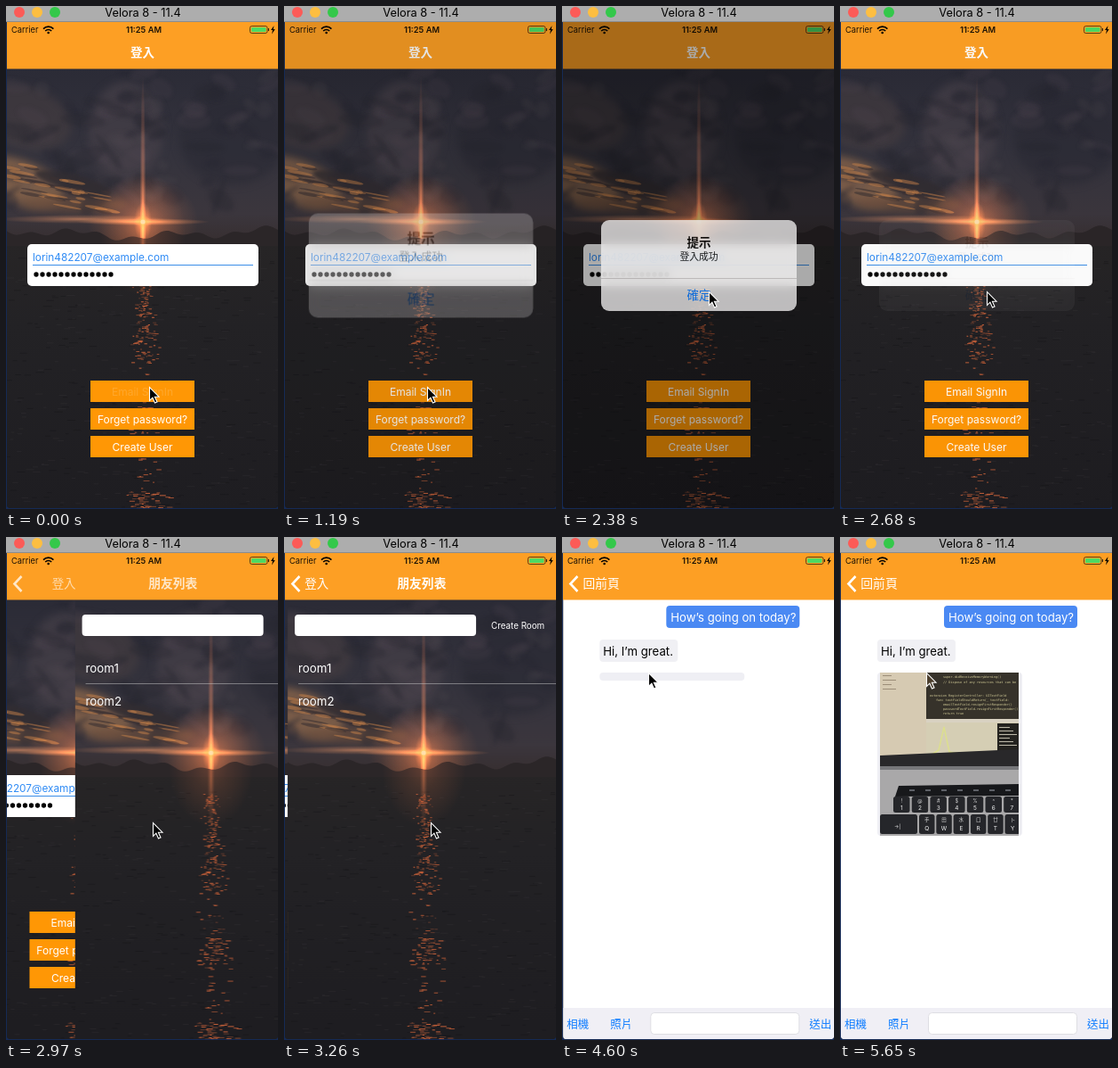
Recreate the animation shown at these times as an HTML page with a canvas. Size 306 px wide and 564 px high, loop 8 s.

```html
<!DOCTYPE html>
<html lang="zh-Hant">
<head>
<meta charset="utf-8">
<title>Login and chat demo</title>
<style>
html, body { margin: 0; width: 100%; height: 100%; overflow: hidden; background: #152a55; }
#stage { position: absolute; left: 0; top: 0; width: 306px; height: 564px; overflow: hidden; background: #152a55; }
#screen { position: absolute; left: 1px; top: 18px; width: 305px; height: 545px; overflow: hidden; border-radius: 0 0 4px 4px; background: #1d1d1f; }
.page, .page > *, #dim, #nav { position: absolute; left: 0; top: 0; width: 305px; height: 545px; }
#chat { background: #fff; }
#dim { background: #000; }
#alert { position: absolute; left: 43px; top: 222px; width: 220px; height: 102px; border-radius: 9px; overflow: hidden;
  background: rgba(247, 246, 246, .9); backdrop-filter: blur(6px); }
#bar, #cursor { position: absolute; left: 0; top: 0; }
svg { display: block; overflow: hidden; }
text { font-family: Inter, "Noto Sans CJK TC", "Noto Sans CJK JP", "Noto Sans CJK", sans-serif; dominant-baseline: central; white-space: pre; }
.mono text { font-family: "DejaVu Sans Mono", monospace; }
</style>
</head>
<body>
<div id="stage">
  <div id="screen">
    <div class="page" id="login"><canvas width="305" height="545"></canvas></div>
    <div class="page" id="rooms"><canvas width="305" height="545"></canvas></div>
    <div class="page" id="chat"></div>
    <div id="nav"></div>
    <div id="dim"></div>
    <div id="alert"></div>
  </div>
  <div id="bar"></div>
  <svg id="cursor" width="14" height="21" viewBox="-1 -1 14 21">
    <path id="arrow" d="M.5 .7V15.4L3.9 12.2L6.5 18L9 16.9L6.4 11.2H11Z" fill="#000" stroke="#fff" stroke-width="1.1"/>
  </svg>
</div>
<script>
const LOOP = 8000, STEP = 148.1, W = 305;
const BLUE = '#0f7dff', ORANGE = '#ff9705';
const $ = id => document.getElementById(id);

// ---- markup helpers
const text = (x, y, s, size, fill = '#fff', more = '') =>
  `<text x="${x}" y="${y}" font-size="${size}" fill="${fill}" ${more}>${s}</text>`;
const mid = (x, y, s, size, fill, more = '') => text(x, y, s, size, fill, 'text-anchor="middle" ' + more);
const rect = (x, y, w, h, fill, r = 0, more = '') =>
  `<rect x="${x}" y="${y}" width="${w}" height="${h}" rx="${r}" fill="${fill}" ${more}/>`;
const circle = (x, y, r, fill) => `<circle cx="${x}" cy="${y}" r="${r}" fill="${fill}"/>`;
const put = (id, body, box = [1, 18, W, 545]) => $(id).insertAdjacentHTML('beforeend',
  `<svg width="${box[2]}" height="${box[3]}" viewBox="${box.join(' ')}">${body}</svg>`);
const repeat = (n, fn) => Array.from({ length: n }, (_, i) => fn(i)).join('');

// ---- sunset backdrop
function sunset(canvas) {
  const c = canvas.getContext('2d');
  let seed = 11;
  const rnd = () => (seed = (seed * 16807) % 2147483647) / 2147483647;
  const bell = () => rnd() + rnd() + rnd() - 1.5;
  const fade = (g, stops) => { stops.forEach(([o, col]) => g.addColorStop(o, col)); return g; };
  const blob = (x, y, rx, ry, col, turn = 0) => {
    c.fillStyle = col;
    c.beginPath();
    c.ellipse(x, y, rx, ry, turn, 0, 7);
    c.fill();
  };
  const glow = (x, y, rx, ry, rgb, alpha) => {
    c.save();
    c.translate(x, y);
    c.scale(rx, ry);
    c.fillStyle = fade(c.createRadialGradient(0, 0, 0, 0, 0, 1),
      [[0, `rgba(${rgb},${alpha})`], [.4, `rgba(${rgb},${alpha * .5})`], [1, `rgba(${rgb},0)`]]);
    c.fillRect(-1, -1, 2, 2);
    c.restore();
  };
  c.translate(-1, -18);

  // sky and clouds
  c.fillStyle = fade(c.createLinearGradient(0, 70, 0, 262),
    [[0, '#2b2b36'], [.5, '#34333d'], [.85, '#3b363d'], [1, '#372f31']]);
  c.fillRect(0, 0, 306, 270);
  c.filter = 'blur(5px)';
  blob(135, 140, 42, 55, 'rgba(74,68,76,.6)');
  blob(20, 125, 55, 35, 'rgba(70,62,66,.6)', .3);
  blob(15, 197, 52, 24, 'rgba(134,100,76,.85)', .35);
  blob(75, 222, 60, 9, 'rgba(108,78,60,.7)');
  blob(255, 150, 60, 50, 'rgba(42,42,52,.6)');
  c.filter = 'blur(2px)';
  for (let i = 0; i < 80; i++)
    blob(rnd() * 306, 75 + rnd() * 145, 6 + rnd() * 20, 3 + rnd() * 7,
      i % 2 ? 'rgba(38,38,48,.35)' : 'rgba(82,76,84,.18)', bell());
  blob(75, 198, 44, 9, 'rgba(50,45,50,.85)', .25);
  c.filter = 'blur(.7px)';
  for (let i = 0; i < 44; i++) {
    const x = rnd() * 115;
    blob(x, 168 + x * .35 + rnd() * 34, 4 + rnd() * 13, .8 + rnd() * 1.4,
      i % 2 ? 'rgba(200,130,74,.5)' : 'rgba(58,48,50,.6)', .18);
  }
  c.filter = 'none';

  // sun
  c.globalCompositeOperation = 'lighter';
  glow(154, 242, 62, 52, '150,66,20', .6);
  glow(85, 239, 95, 5, '190,105,50', .6);
  glow(154, 242, 75, 4, '230,120,50', .75);
  glow(154, 242, 3.5, 165, '190,88,38', .75);
  glow(154, 242, 10, 22, '220,100,35', .6);
  c.globalCompositeOperation = 'source-over';

  // mountains and water
  c.fillStyle = '#2b2628';
  c.beginPath();
  c.moveTo(0, 285);
  for (let x = 0; x <= 306; x += 3)
    c.lineTo(x, 255 + 3.5 * Math.sin(x / 17) + 2.5 * Math.sin(x / 6) - 3 * Math.cos(x / 49));
  c.lineTo(306, 285);
  c.fill();
  c.fillStyle = fade(c.createLinearGradient(0, 268, 0, 563), [[0, '#272526'], [.3, '#232225'], [1, '#1e1d21']]);
  c.fillRect(0, 269, 306, 300);
  for (let i = 0; i < 420; i++) {
    c.fillStyle = i % 2 ? 'rgba(62,58,62,.28)' : 'rgba(16,16,19,.32)';
    c.fillRect(rnd() * 306, 276 + rnd() * 288, 3 + rnd() * 7, 1);
  }
  c.globalCompositeOperation = 'lighter';
  glow(154, 255, 48, 70, '95,42,18', .6);
  glow(154, 270, 4, 60, '130,60,28', .6);
  c.globalCompositeOperation = 'source-over';
  glow(154, 242, 8, 8, '255,175,90', 1);
  blob(154, 242, 2.6, 2.6, '#ffe0ac');

  // reflection, brighter in bands
  for (let i = 0; i < 620; i++) {
    const y = 288 + rnd() * 275, d = (y - 288) / 275;
    const band = Math.max(0, Math.cos((y - 463) / 15.3));
    if (rnd() > (y < 400 ? .75 : .2 + .75 * band)) continue;
    c.fillStyle = ['#c4603a', '#7d4530', '#a65334', '#5c382d'][i % 4];
    c.fillRect(153 + d * 5 + bell() * (7 + 19 * d), y, 1.5 + rnd() * (2 + 4 * d), 1);
  }
}
document.querySelectorAll('canvas').forEach(sunset);

// ---- login page
const button = (y, label, id) => rect(95, y, 117, 24, ORANGE) +
  mid(153.5, y + 12.5, label, 12, '#fff', `id="${id}"`);
put('login',
  rect(24, 267, 260, 47, '#fff', 5) +
  text(30, 282, 'lorin482207@example.com', 11.8, '#2f8bf5') +
  rect(30, 290, 248, 1, '#3b8ee8') +
  repeat(13, i => circle(34 + 7 * i, 301, 2.65, '#000')) +
  button(420, 'Email SignIn', 'signIn') +
  button(451, 'Forget password?', 'forget') +
  button(482, 'Create User', 'create'));

// ---- room list
put('rooms',
  rect(9, 87, 204, 24, '#fff', 4) +
  text(230, 99.5, 'Create Room', 9.8) +
  text(13, 146.5, 'room1', 13.3) +
  rect(13, 164, 293, 1, 'rgba(200,200,200,.5)') +
  text(13, 183.5, 'room2', 13.3));

// ---- chat page
const code = [
  [116, 157, 'super.didReceiveMemoryWarning()'],
  [116, 162.5, '// Dispose of any resources that can be'],
  [101, 178, 'extension RegisterController: UITextField'],
  [108, 183, 'func textFieldShouldReturn(_ textField:'],
  [116, 188, 'emailTextField.resignFirstResponder()'],
  [116, 193, 'passwordTextField.resignFirstResponder()'],
  [116, 198, 'return true']
];
const key = (x, y, w, h, top, low) => rect(x, y, w, h, '#25262a', 2.5) +
  mid(x + w / 2, y + h * .28, top, 5.5, '#d8d8d8') + mid(x + w / 2, y + h * .72, low, 6.5, '#f2f2f2');
const laptop =
  rect(45, 152, 156, 183, '#cfc1a6') +
  rect(45, 152, 52, 93, '#d6cab2') +
  repeat(4, i => rect(48, 155 + i * 5, 10 + i % 2 * 5, 1, '#9c8e78')) +
  rect(97, 152, 104, 52, '#36322a') +
  `<g class="mono">${code.map(([x, y, s]) => text(x, y, s, 3.5, '#d6cf9a')).join('')}</g>` +
  rect(97, 204, 104, 4, '#d9d2c2') +
  rect(97, 208, 104, 37, '#d5ceb4') +
  '<path d="M103 244l8-5 6-26 6 28 12 2" fill="none" stroke="#dcdf8e" stroke-width="1.5"/>' +
  rect(177, 209, 24, 32, '#24231f') +
  repeat(6, i => rect(179, 213 + i * 4, 12 + i % 3 * 4, 1, '#bdb9a8')) +
  '<path d="M45 245L201 238V258L45 258Z" fill="#29282a"/>' +
  rect(45, 257, 156, 78, '#a9a8a9') +
  rect(45, 257, 156, 4, '#77777a') +
  '<path d="M66 279L201 277V290L62 291Z" fill="#17181b"/>' +
  repeat(7, i => rect(78 + i * 18, 283, 6, 2, '#5d6066')) +
  repeat(7, i => key(60 + i * 20.7, 291, 18.5, 18, '!@#$%^*'[i], i + 1)) +
  rect(45, 311, 42, 22, '#25262a', 2.5) + text(61, 325, '→|', 5.5, '#eee') +
  repeat(6, i => key(89 + i * 19.3, 311, 17.5, 22, '手田水口廿卜'[i], 'QWERTY'[i]));
put('chat',
  rect(117, 77, 150, 25, '#4a89f3', 4) +
  text(122, 89.5, 'How’s going on today?', 13.2) +
  rect(42, 115, 88, 25, '#f0f0f4', 4) +
  text(46, 127.5, 'Hi, I’m great.', 13.2, '#000') +
  rect(42, 152, 163, 9, '#efeff4', 4, 'id="bubble"') +
  `<svg id="photo" x="45" y="152" width="156" height="183" viewBox="45 152 156 183">${laptop}</svg>` +
  rect(1, 528, 305, 36, '#f0eff5') +
  rect(99.5, 533.5, 167, 24, '#fff', 4, 'stroke="#dedee3"') +
  text(5, 546, '相機', 12.5, BLUE) + text(54, 546, '照片', 12.5, BLUE) + text(278, 546, '送出', 12.5, BLUE));

// ---- status and navigation bar
put('nav',
  rect(1, 18, 305, 52, '#fd9f24') + rect(1, 70, 305, 1, 'rgba(253,159,36,.5)') +
  text(6, 26.5, 'Carrier', 9.3, '#1c1205') +
  '<g fill="none" stroke="#000" stroke-width="1.6"><path d="M42 25.6a7.8 7.8 0 0 1 11.4 0M44.2 28a4.8 4.8 0 0 1 7 0"/></g>' +
  circle(47.7, 30, 1.3, '#000') +
  mid(155, 26.5, '11:25 AM', 9.3, '#1c1205', 'font-weight="600"') +
  rect(274.5, 22.5, 19.5, 8, 'none', 2, 'stroke="#3a2a10" stroke-width=".8"') +
  rect(276, 24, 16.5, 5, '#4cd964', 1) + rect(294.8, 25, 1.2, 3, '#3a2a10') +
  '<path d="M301.5 22l-3.5 5h2l-1 4.5 3.7-5.5h-2z" fill="#000"/>' +
  '<path id="chevron" d="M17.5 44L9.5 52.5L17.5 61" fill="none" stroke="#fff" stroke-width="2.6"/>' +
  mid(0, 52, '登入', 13.5, '#fff', 'id="title1" font-weight="700"') +
  mid(0, 52, '登入', 13.5, '#fff', 'id="back1"') +
  mid(0, 52, '朋友列表', 13.8, '#fff', 'id="title2" font-weight="700"') +
  mid(0, 52, '回前頁', 13.8, '#fff', 'id="back2"'));

// ---- alert
put('alert',
  mid(154, 265, '提示', 13.5, '#000', 'font-weight="700"') +
  mid(154, 282, '登入成功', 10.8, '#000') +
  rect(44, 305, 220, 1, 'rgba(110,105,105,.35)') +
  mid(154, 324, '確定', 13.5, BLUE), [44, 240, 220, 102]);

// ---- window title bar
put('bar',
  rect(0, 0, 306, 17, '#adadad') + rect(0, 17, 306, 1, '#8c8c8c') +
  circle(15, 7, 6, '#fc5b57') + circle(35, 7, 6, '#fdbe41') + circle(55, 7, 6, '#34c84a') +
  mid(154, 7.5, 'Velora 8 - 11.4', 12.8, '#000'), [0, 0, 306, 18]);

// ---- motion
const path = [[0, 161, 427], [1200, 161, 427], [1760, 160, 315], [1960, 160, 315], [2060, 165, 320],
  [3270, 165, 320], [3400, 126, 189], [3550, 111, 170], [3690, 99, 153], [3980, 97, 152], [LOOP, 97, 152]];

const settle = (t, start, rate = 13.3) => {
  const k = Math.max(0, t - start) / 1000 * rate;
  return 1 - (1 + k) * Math.exp(-k);
};
const mix = (a, b, p) => a + (b - a) * p;
const clamp = v => Math.min(1, Math.max(0, v));
const place = (id, x, alpha) => {
  $(id).setAttribute('x', x);
  $(id).setAttribute('opacity', clamp(alpha));
};
const slide = (id, x, shown) => {
  $(id).style.transform = `translateX(${x}px)`;
  $(id).style.visibility = shown ? 'visible' : 'hidden';
};

function draw(t) {
  $('signIn').setAttribute('opacity', clamp(Math.max(.15, (t - 80) / 500)));

  const rise = settle(t, 1110), gone = settle(t, 2315);
  const shown = rise * (1 - gone);
  $('dim').style.opacity = .4 * shown;
  $('alert').style.opacity = shown;
  $('alert').style.visibility = shown > .004 ? 'visible' : 'hidden';
  $('alert').style.transform = `scale(${1.2 - .2 * rise})`;

  const a = settle(t, 2760), b = settle(t, 3930, 14);
  slide('login', -.3 * W * a, a < .998);
  slide('rooms', W * (1 - a) - .3 * W * b, a > 0 && b < .998);
  slide('chat', W * (1 - b), b > 0);

  $('chevron').setAttribute('opacity', a);
  place('title1', mix(153.5, 35.5, a), 1 - a * 1.5);
  place('back1', mix(153.5, 35.5, a) - 50 * b, (a * 1.5 - .5) * (1 - b * 1.6));
  place('title2', mix(mix(290, 153.5, a), 44, b), a * (1 - b * 1.4));
  place('back2', mix(153.5, 44, b), b * 1.5 - .5);

  const loaded = t >= 5320;
  $('photo').setAttribute('visibility', loaded ? 'visible' : 'hidden');
  $('bubble').setAttribute('height', loaded ? 183 : 9);

  const i = path.findIndex(p => p[0] > t);
  const [t0, x0, y0] = path[i - 1], [t1, x1, y1] = path[i];
  const p = (t - t0) / (t1 - t0);
  $('cursor').style.transform = `translate(${mix(x0, x1, p) - 1}px, ${mix(y0, y1, p) - 1}px)`;
  $('arrow').setAttribute('fill', t >= 5620 ? '#4a3d2c' : '#000');
}

function tick() {
  const now = performance.now() % LOOP;
  draw(Math.floor(now / STEP) * STEP);
  requestAnimationFrame(tick);
}
tick();
</script>
</body>
</html>
```
